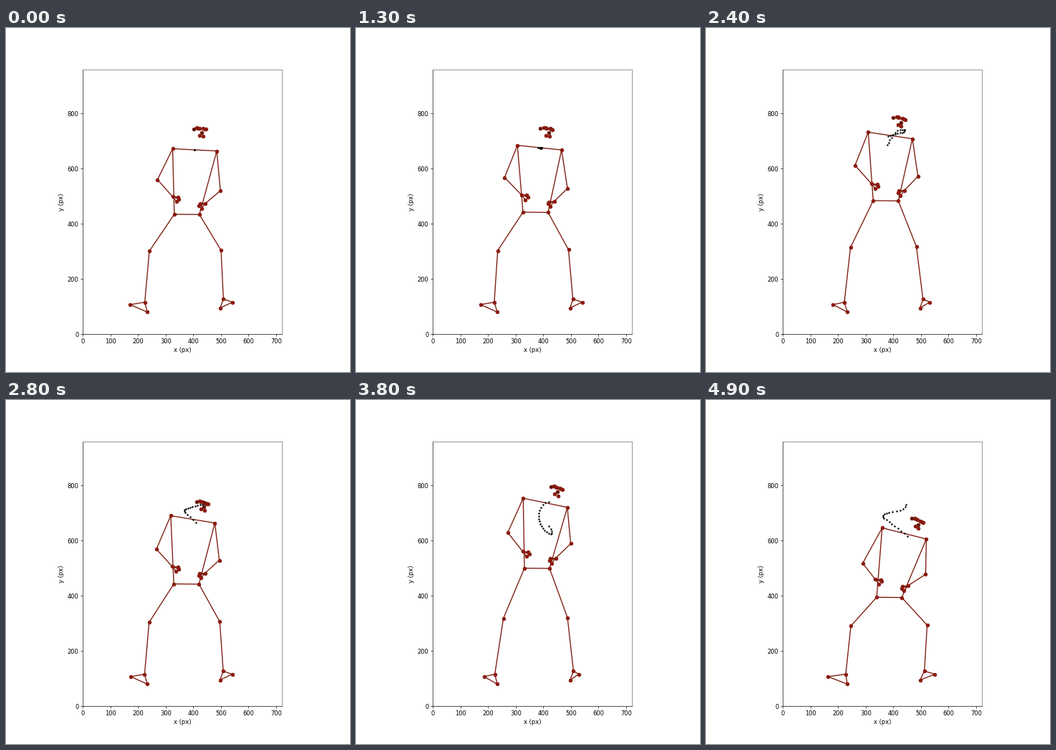
These frames come from a looping animation (480x480 px, 5000 ms). A matplotlib script:

```python
import numpy as np
import matplotlib.pyplot as plt
from matplotlib.animation import FuncAnimation

FRAMES, INTERVAL = 50, 100
STEP = 0.05          # seconds between trail samples
TRAIL = 20           # samples kept in the trail
LINE, JOINT, DARK = "#7c190d", "#94180d", "#561810"

# Turning points of the chest: time in seconds, x, y.
SWAY = np.array([
    (0, 405, 668), (.5, 390, 674), (1.3, 386, 676), (1.42, 377, 675),
    (1.6, 387, 704), (1.8, 415, 737), (1.95, 440, 742), (2.1, 437, 734),
    (2.4, 389, 720), (2.6, 367, 708), (2.8, 398, 677), (2.95, 428, 643),
    (3.08, 429, 624), (3.25, 405, 637), (3.45, 385, 670), (3.6, 384, 698),
    (3.8, 407, 737), (3.97, 446, 735), (4.1, 436, 714), (4.3, 384, 702),
    (4.5, 362, 687), (4.7, 395, 661), (4.95, 451, 617)])
TIMES, CHEST = SWAY[:, 0], SWAY[:, 1] + 1j * SWAY[:, 2]
SLOPES = np.gradient(CHEST, TIMES)
REST = 405 + 680j

# Resting place on the left and right, then how far the part follows the chest
# sideways, opens outwards as the chest sinks, and follows it up and down.
LIMBS = {
    "elbow": (270 + 572j, 498 + 532j, .55, 0, 1),
    "wrist": (325 + 509j, 444 + 485j, .25, 0, .9),
    "hip": (331 + 446j, 422 + 445j, .25, 0, .95),
    "knee": (243 + 304j, 498 + 307j, .4, .2, .25),
    "ankle": (224 + 116j, 509 + 127j, .1, 0, 0),
    "heel": (233 + 80j, 497 + 95j, 0, 0, 0),
    "toe": (174 + 107j, 540 + 116j, 0, .2, 0),
}
HAND = {"pinky": -20 - 2j, "index": -23 - 9j, "thumb": -14 - 18j}
EAR, MOUTH = -30 + 13j, [-9 - 10j, 4 - 13j]
EYES = [-14 + 17j, 9 + 14j]

CHAINS = ["shoulder elbow wrist pinky index wrist thumb",
          "shoulder hip knee ankle heel toe ankle"]


def chest(t):
    """Cubic Hermite curve through the turning points."""
    i = np.clip(np.searchsorted(TIMES, t, side="right") - 1, 0, len(TIMES) - 2)
    h = TIMES[i + 1] - TIMES[i]
    u = (t - TIMES[i]) / h
    v = 1 - u
    return (v * v * ((1 + 2 * u) * CHEST[i] + u * h * SLOPES[i])
            + u * u * ((3 - 2 * u) * CHEST[i + 1] - v * h * SLOPES[i + 1]))


def body_side(t, side):
    """Joints of one half of the body; side is -1 for left, 1 for right."""
    shift = chest(t) - REST
    points = {"shoulder": chest(t) + side * (80 - (4 + 3.3 * t) * 1j)}
    for name, (left, right, follow, spread, lift) in LIMBS.items():
        rest = left if side < 0 else right
        points[name] = (rest + follow * shift.real - side * spread * shift.imag
                        + 1j * lift * shift.imag)
    for name, offset in HAND.items():
        points[name] = points["wrist"] + side * offset.real + 1j * offset.imag
    return points


def face(t):
    """The head leans forward and turns slowly; nose and ear come first."""
    nose = chest(t) + 26 + 5 * t + (62 - 6 * t) * 1j
    eyes = [eye + k * (5 - 1j) for eye in EYES for k in (-1, 0, 1)]
    turn = np.exp(-1j * np.radians(4 * t))
    return nose + turn * np.array([0, EAR, *eyes, *MOUTH])


def place(artist, points):
    points = np.asarray(points)
    artist.set_data(points.real, points.imag)


fig, ax = plt.subplots(figsize=(8, 8), dpi=60)
ax.set_aspect("equal")
ax.set(xlim=(0, 720), ylim=(0, 960), xlabel="x (px)", ylabel="y (px)",
       xticks=range(0, 701, 100), yticks=range(0, 801, 200))
ax.spines[["top", "right"]].set_color("0.4")

bones = [ax.plot([], [], color=LINE, lw=1.6, zorder=2)[0] for _ in range(6)]
trail, = ax.plot([], [], "o", color="black", ms=3, mew=0, zorder=2.2)
dots, dark_dots = (
    ax.plot([], [], "o", color=color, mec=LINE, ms=5.6, mew=1, zorder=2.5)[0]
    for color in (JOINT, DARK))


def update(frame):
    t = frame * INTERVAL / 1000
    left, right = body_side(t, -1), body_side(t, 1)
    lines = [[half[name] for name in chain.split()]
             for half in (left, right) for chain in CHAINS]
    lines += [[left[name], right[name]] for name in ("shoulder", "hip")]
    for bone, line in zip(bones, lines):
        place(bone, line)

    head = face(t)
    place(dark_dots, head[:2])
    place(dots, [*left.values(), *right.values(), *head[2:]])

    newest = 2 * frame + 1
    samples = range(max(0, newest - TRAIL + 1), newest + 1)
    place(trail, [chest(k * STEP) for k in samples])
    return [*bones, trail, dots, dark_dots]


anim = FuncAnimation(fig, update, frames=FRAMES, interval=INTERVAL, repeat=True,
                     repeat_delay=0)
plt.show()
```
